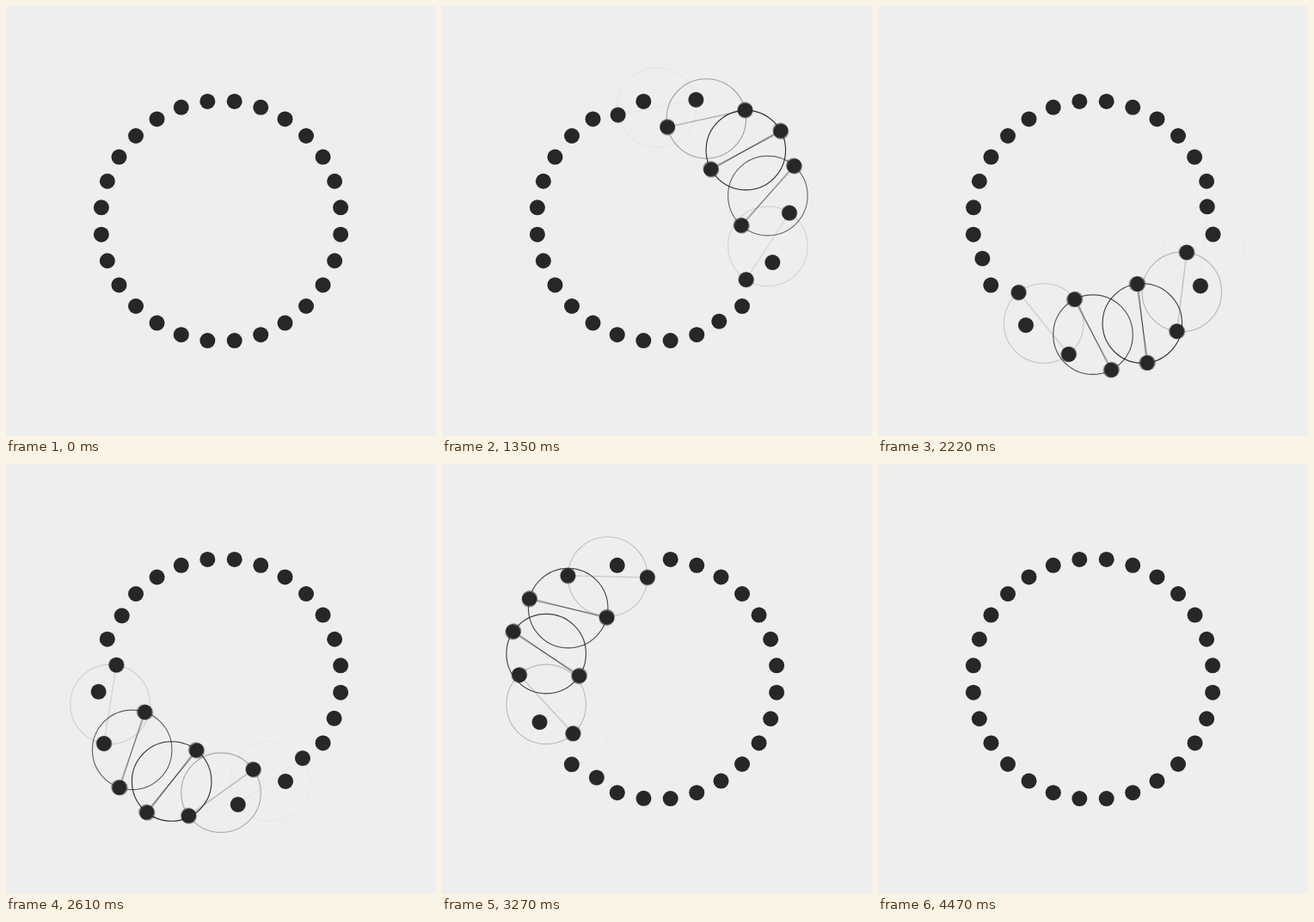
An HTML page with a canvas for the animation above (5.17 s loop, 500 by 500 pixels).

```html
<!DOCTYPE html>
<html lang="en">
<head>
<meta charset="utf-8">
<title>Swapping dots</title>
<style>
  html, body { margin: 0; width: 100%; height: 100%; overflow: hidden; background: #eee; }
  canvas { display: block; }
</style>
</head>
<body>
<canvas id="stage" width="500" height="500"></canvas>
<script>
const SIZE = 500, MID = SIZE / 2;
const LOOP = 5170, STEP = 30, FRAMES = 150;
const SWAP = 1800;                                // time one pair takes to trade places
const PAIRS = 14;
const STAGGER = (STEP * FRAMES - SWAP) / (PAIRS - 1);
const RING = 140, DOT = 9;
const SPREAD = 1.5 * Math.PI / PAIRS;             // half angle between the dots of a pair
const ORBIT = RING * Math.sin(SPREAD);
const HUB = RING * Math.cos(SPREAD);
const SAMPLES = 6, SHUTTER = 0.6;                 // motion blur
const BACK = '#eeeeee', INK = '#272727';

const screen = document.getElementById('stage').getContext('2d');
const layer = document.createElement('canvas');
layer.width = layer.height = SIZE;
const ctx = layer.getContext('2d');

const smooth = u => u * u * (3 - 2 * u);
const ease = u => smooth(smooth(Math.min(1, Math.max(0, u))));

function circle(x, y, r) {
  ctx.beginPath();
  ctx.arc(x, y, r, 0, 2 * Math.PI);
}

function pairAt(index, time) {
  const turn = index * 2 * Math.PI / PAIRS;
  const done = ease((time - index * STAGGER) / SWAP);
  const angle = turn + Math.PI * done;
  return {
    x: MID + HUB * Math.sin(turn),
    y: MID - HUB * Math.cos(turn),
    dx: ORBIT * Math.cos(angle),
    dy: ORBIT * Math.sin(angle),
    glow: Math.sin(Math.PI * done) ** 2
  };
}

function drawScene(time) {
  const pairs = Array.from({ length: PAIRS }, (_, i) => pairAt(i, time));
  ctx.globalAlpha = 1;
  ctx.fillStyle = BACK;
  ctx.fillRect(0, 0, SIZE, SIZE);

  ctx.strokeStyle = INK;
  ctx.lineWidth = 1.1;
  for (const { x, y, dx, dy, glow } of pairs) {
    if (glow < 0.004) continue;
    ctx.globalAlpha = glow;
    circle(x, y, ORBIT);
    ctx.moveTo(x - dx, y - dy);
    ctx.lineTo(x + dx, y + dy);
    ctx.stroke();
  }

  ctx.globalAlpha = 1;
  ctx.fillStyle = INK;
  for (const { x, y, dx, dy } of pairs) {
    for (const side of [-1, 1]) {
      circle(x + side * dx, y + side * dy, DOT);
      ctx.fill();
    }
  }
}

function render(frame) {
  for (let i = 0; i < SAMPLES; i++) {
    drawScene((frame + SHUTTER * (i + 0.5) / SAMPLES) * STEP);
    screen.globalAlpha = 1 / (i + 1);             // running average of the samples
    screen.drawImage(layer, 0, 0);
  }
}

const start = performance.now();
let shown = -1;

function tick() {
  const time = (performance.now() - start) % LOOP;
  const frame = Math.min(FRAMES - 1, Math.floor(time / STEP));
  if (frame !== shown) render(shown = frame);
  requestAnimationFrame(tick);
}
tick();
</script>
</body>
</html>
```
